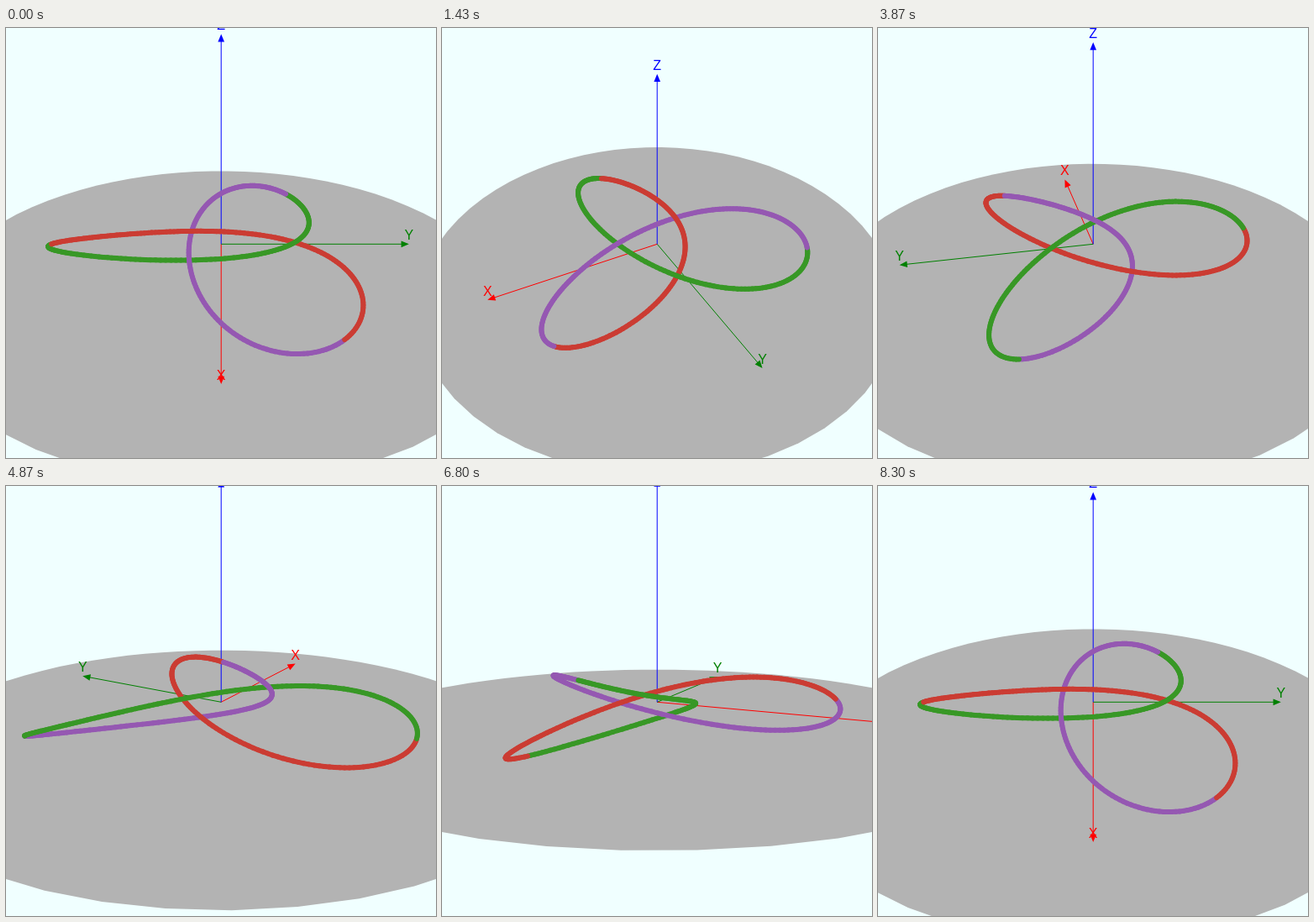
These frames come from a looping animation (512x512 px, 8.33 s). An HTML page with a canvas:

```html
<!DOCTYPE html>
<html lang="en">
<head>
<meta charset="utf-8">
<title>Trefoil knot</title>
<style>
  html, body { margin: 0; width: 100%; height: 100%; overflow: hidden; background: #f0ffff; }
  canvas { display: block; width: 512px; height: 512px; }
</style>
</head>
<body>
<canvas id="stage" width="512" height="512"></canvas>
<script>
const ctx = document.getElementById('stage').getContext('2d');
const { sin, cos, PI, hypot, atan2 } = Math;

const LOOP = 8330, STEPS = 249;
const FOCAL = 500, CENTER = [256.2, 257.3];
const ORBIT = 6, AXIS = 3, DISC = 4;
const PURPLE = '#9558b2', RED = '#cb3c33', GREEN = '#389826';

// World points
const disc = Array.from({ length: 63 }, (_, i) => [DISC * cos(i / 10), DISC * sin(i / 10), 0]);
const axes = [
  ['X', 'red', [AXIS, 0, 0]],
  ['Y', 'green', [0, AXIS, 0]],
  ['Z', 'blue', [0, 0, AXIS]]
];
const knot = t => [
  1.1 * sin(t) + 1.61 * sin(2 * t),
  1.1 * cos(t) - 1.61 * cos(2 * t),
  -0.23 * sin(3 * t)
];

// Three coloured arcs, each running from one lobe tip to the next
const PARTS = 360;
const pieces = Array.from({ length: PARTS }, (_, i) => {
  const at = n => knot(-PI / 3 + n * 2 * PI / PARTS);
  return { a: at(i), b: at(i + 1), color: [PURPLE, RED, GREEN][Math.floor(i * 3 / PARTS)] };
});

// Camera circling the Z axis while it bobs up and down
function camera(angle) {
  const height = 3 + 2 * sin(angle);
  const dist = hypot(ORBIT, height);
  const s = height / dist, c = ORBIT / dist;
  return ([x, y, z]) => {
    const side = y * cos(angle) - x * sin(angle);
    const near = x * cos(angle) + y * sin(angle);
    const depth = dist - near * c - z * s;
    const k = FOCAL / depth;
    return { x: CENTER[0] + k * side, y: CENTER[1] + k * (near * s - z * c), depth };
  };
}

function fillShape(points, color) {
  ctx.fillStyle = color;
  ctx.beginPath();
  for (const p of points) ctx.lineTo(p.x, p.y);
  ctx.closePath();
  ctx.fill();
}

function line(a, b, color, width) {
  ctx.strokeStyle = color;
  ctx.lineWidth = width;
  ctx.beginPath();
  ctx.moveTo(a.x, a.y);
  ctx.lineTo(b.x, b.y);
  ctx.stroke();
}

function arrow(from, tip, color, name) {
  const dir = atan2(tip.y - from.y, tip.x - from.x);
  const back = (len, turn) => ({ x: tip.x - len * cos(dir + turn), y: tip.y - len * sin(dir + turn) });
  if (hypot(tip.x - from.x, tip.y - from.y) > 5) line(from, back(5, 0), color, 1);
  fillShape([tip, back(10, PI / 8), back(10, -PI / 8)], color);
  ctx.fillText(name, tip.x, tip.y - 5);
}

function draw(step) {
  const project = camera(2 * PI * step / STEPS);
  ctx.fillStyle = '#f0ffff';
  ctx.fillRect(0, 0, 512, 512);
  fillShape(disc.map(project), '#b3b3b3');

  ctx.lineCap = 'butt';
  ctx.font = '16px "Liberation Sans", Arial, sans-serif';
  ctx.textAlign = 'center';
  const origin = project([0, 0, 0]);
  for (const [name, color, end] of axes) arrow(origin, project(end), color, name);

  // Nearer pieces are painted first
  ctx.lineCap = 'round';
  pieces
    .map(({ a, b, color }) => ({ a: project(a), b: project(b), color }))
    .sort((p, q) => p.a.depth - q.a.depth)
    .forEach(p => line(p.a, p.b, p.color, 6));
}

const start = performance.now();
function tick() {
  const time = Math.max(0, performance.now() - start) % LOOP;
  // 30 steps per second, each starting on the nearest 10 ms
  const step = Math.ceil((Math.floor(time / 10) + 0.5) * 0.3) - 1;
  draw(Math.min(step, STEPS));
  requestAnimationFrame(tick);
}
tick();
</script>
</body>
</html>
```
